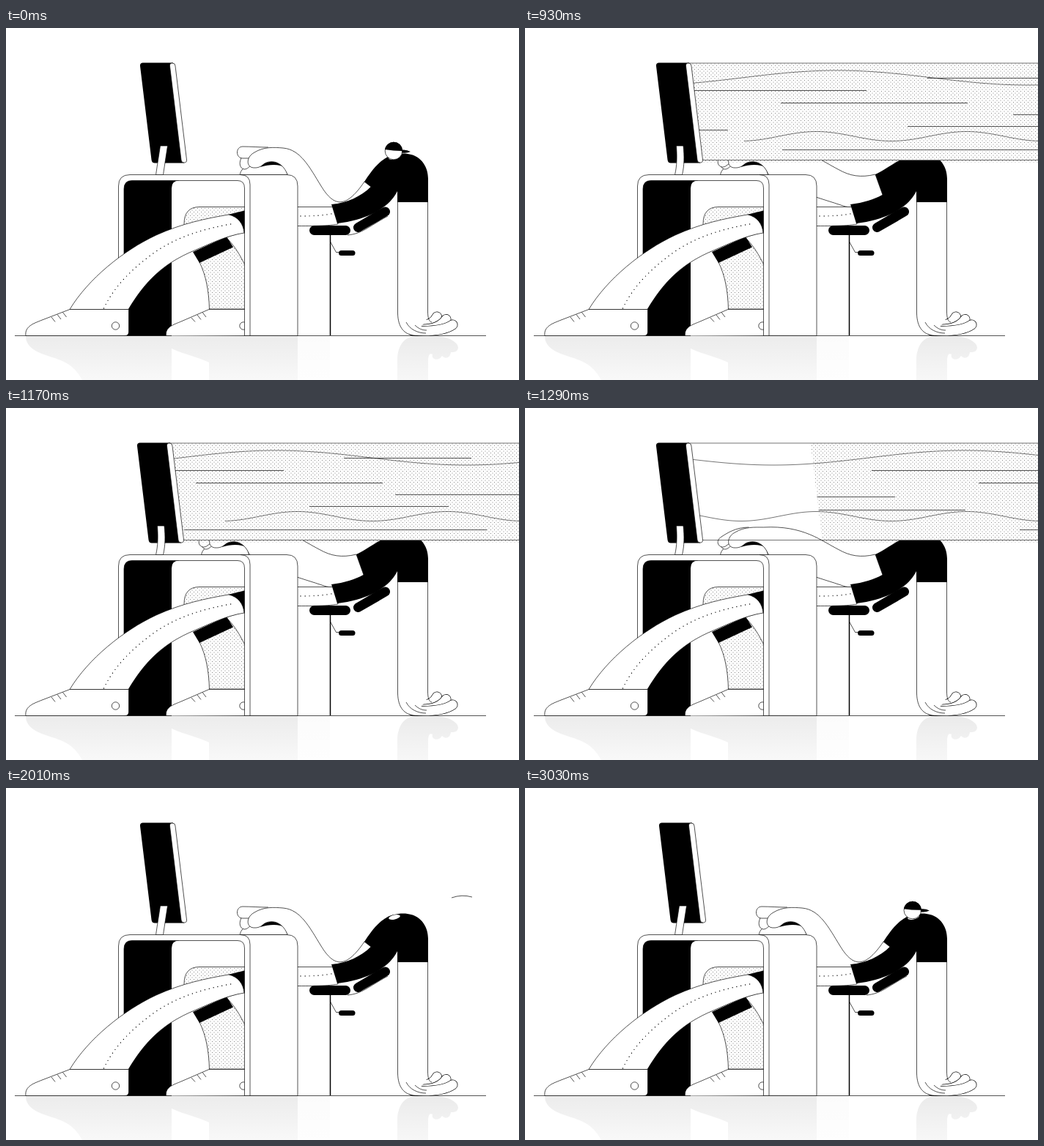
Animation of 700 by 481 pixels, one loop 3.06 s. Source, as an HTML page:

```html
<!DOCTYPE html>
<html lang="en">
<head>
<meta charset="utf-8">
<title>Desk nap</title>
<style>
html, body { margin: 0; width: 100%; height: 100%; overflow: hidden; background: #fff; }
svg { display: block; width: 700px; height: 481px; }
.o { fill: #fff; stroke: #000; stroke-width: .68; stroke-linejoin: round; }
.l { fill: none; stroke: #000; stroke-width: .68; }
.pole { stroke-width: 1.5; }
.beam { stroke-width: .55; }
.seam { fill: none; stroke: #000; stroke-width: 1.4; stroke-linecap: round; stroke-dasharray: 0 6; }
.finger { fill: none; stroke-linecap: round; }
</style>
</head>
<body>
<svg viewBox="0 0 700 481">
  <defs>
    <linearGradient id="fade" gradientUnits="userSpaceOnUse" x1="0" y1="421" x2="0" y2="490">
      <stop offset="0" stop-opacity=".08"/><stop offset="1" stop-opacity=".025"/>
    </linearGradient>
    <linearGradient id="faint" gradientUnits="userSpaceOnUse" x1="0" y1="421" x2="0" y2="490">
      <stop offset="0" stop-opacity=".075"/><stop offset="1" stop-opacity=".02"/>
    </linearGradient>
    <pattern id="dots" width="5" height="5" patternUnits="userSpaceOnUse">
      <circle cx="1.5" cy="1.5" r=".44"/><circle cx="4" cy="4" r=".44"/>
    </pattern>
    <clipPath id="inside"><rect x="161" y="208" width="164.5" height="212.5"/></clipPath>
    <clipPath id="beamClip"><polygon id="beamArea"/></clipPath>
    <clipPath id="waveClip"><polygon id="waveArea"/></clipPath>
  </defs>

  <!-- reflections -->
  <path fill="url(#faint)" d="M27 421C27 438 45 444 60 449S92 458 104 481H226V438C240 445 260 449 277 457V481H398V421Z"/>
  <path fill="url(#faint)" d="M398 421H442V481H398Z" opacity=".2"/>
  <path fill="url(#fade)" d="M534 481V452C535 432 545 421 560 421H590C606 423 617 430 617 437C616 444 609 443 607 443C606 451 600 453 595 448C590 456 580 453 582 446C577 443 576 450 576 456V481Z"/>
  <path class="l" d="M12 420.5H655"/>

  <!-- chair base -->
  <path class="l pole" d="M442.5 282V420"/>
  <path class="l" d="M442.5 292L450.5 306.5H456"/>
  <rect x="454" y="304" width="22.5" height="7" rx="3.5"/>

  <!-- mouse, hand and reaching arm -->
  <g id="hand">
    <path class="o" d="M319 200.5C323 178 380 172 384 200.5Z"/>
    <path d="M347 190C357 177 377 177 381.5 191C374 186 360 186 347 190Z"/>
    <path class="o" d="M322 176C317 184 319 192 325 193C330 193 332 189 336 186V176Z"/>
    <path class="o" id="index"/>
  </g>
  <path class="o" id="arm"/>

  <!-- far thigh, torso, hanging arm -->
  <path class="o" d="M380 244.5H448L453 268C435 271 415 270.5 380 270.5Z"/>
  <path class="seam" d="M402 257C420 257 434 256 446 253.5"/>
  <path class="l" id="spring"/>
  <path id="torso"/>
  <rect x="414" y="270" width="56" height="13" rx="6.5"/>
  <path d="M480.5 272.5L517.5 251" stroke="#000" stroke-width="13" stroke-linecap="round"/>
  <g id="fingers"></g>
  <path fill="#fff" d="M534.5 238V390C535 409 543 420 562 420L567 407C573 402 575.5 396 575.5 388V238Z"/>
  <path class="l" d="M534.5 222V390C535 409 543 420.5 562 420.5M575.5 237V387C575.5 396 577 401 581 402"/>
  <path class="l" d="M546 402C551 412 562 417 573 417M558 406C563 411 568 413 574 413"/>

  <!-- desk -->
  <path class="o" d="M153.5 420V216Q153.5 200.5 169 200.5H383Q398 200.5 398 216V420.5Z"/>
  <path d="M161 420.5V220Q161 208.5 172 208.5H236V420.5Z"/>
  <path fill="#fff" d="M226 421V219Q226 208.5 236 208.5H326V420Z"/>
  <g clip-path="url(#inside)">
    <path class="o" style="fill:url(#dots)" d="M243 384V268Q243 244.5 264 244.5H330V384Z"/>
    <path fill="#fff" d="M226 300H258L264 320C273 338 277 360 277.5 386H226Z"/>
    <path class="l" d="M264 320C273 338 277 360 277.5 385"/>
    <path class="o" d="M300 286C310 295 319 309 327 326V278Z"/>
    <path d="M255 306L301 285L310 299.5L264 321Z"/>
    <path class="o" d="M218.5 420.5C217 408 230 405 239 401L277 384.5H330V420.5Z"/>
    <path class="l" d="M253 396L258 401.5M261 392L266 398.5M268 388.5L273 395"/>
    <circle class="o" cx="324" cy="407" r="5.2"/>
  </g>
  <path class="l" d="M161 310V220Q161 208.5 172 208.5H316Q325.5 208.5 325.5 219V420.5M333 420.5V214Q333 200.5 320 200.5"/>

  <!-- near leg -->
  <path d="M303 255L325.5 249.5V281Z"/>
  <path class="o" d="M87 384.5C112 343 160 304 205 283C240 267 274 260 304 255C317 258 324 268 325 280C300 284 278 295 257 304C214 322 190 346 167 384.5Z"/>
  <path class="seam" d="M133.5 383C148 352 174 327 205 305C235 285 270 274 312 267"/>
  <path class="o" d="M27 420.5C25 407 40 403 48 399.5L87 384.5H167.5V415Q167.5 420.5 162 420.5Z"/>
  <path class="l" d="M62 395L67 401.5M70 391.5L75 398M77.5 388.5L82.5 395"/>
  <circle class="o" cx="149.5" cy="407" r="5.2"/>

  <!-- neck and head -->
  <g transform="rotate(-13 530 176.5)">
    <ellipse cx="530" cy="176.5" rx="8" ry="3" fill="#fff"/>
    <path class="l" id="neckMark" d="M527 174V179"/>
  </g>
  <g id="head">
    <circle class="o" cx="529" cy="168" r="11.8"/>
    <path d="M517 166A12.1 12.1 0 0 1 541 166.5Q547 166 552 169Q547 171.5 540 170.5V168Q529 168 517 166Z"/>
  </g>
  <g id="specks"></g>
  <path class="l" id="wisp" pathLength="1" d="M608 150Q622 145 636 149"/>

  <!-- beam -->
  <g clip-path="url(#beamClip)">
    <path fill="#fff" d="M222 48H700V181H222Z"/>
    <path fill="url(#dots)" d="M222 48H700V184H222Z"/>
    <path class="l" id="streaks"/>
  </g>
  <path class="l beam" id="waves" clip-path="url(#waveClip)"/>

  <!-- monitor -->
  <g id="screen">
    <path d="M187 47.5H228L243 184.5H203Q199 184.5 198.5 180L183 52Q182.5 47.5 187 47.5Z"/>
    <path class="o" d="M223.5 52Q223 48 227 48T231 52L246.5 180Q247 184 243 184T239 180Z"/>
  </g>
  <path class="o" id="stand"/>
</svg>

<script>
const LOOP = 3060, STEP = 30;
const $ = id => document.getElementById(id);
const clamp = v => Math.max(0, Math.min(1, v));
const ramp = (t, a, b) => clamp((t - a) / (b - a));
const ease = (t, a, b) => { const k = ramp(t, a, b); return k * k * (3 - 2 * k); };
const set = (id, name, value) => $(id).setAttribute(name, value);
const show = (id, on) => { $(id).style.display = on ? "" : "none"; };

// blend two paths that share the same commands
function mix(a, b, k) {
  const to = b.match(/-?[\d.]+/g);
  let i = 0;
  return a.replace(/-?[\d.]+/g, n => +(+n + (to[i++] - n) * k).toFixed(2));
}

// value from rows of [time, value]
function track(rows, t) {
  if (t <= rows[0][0]) return rows[0][1];
  for (let i = 1; i < rows.length; i++) {
    const [a, u] = rows[i - 1], [b, v] = rows[i];
    if (t <= b) return u + (v - u) * ease(t, a, b);
  }
  return rows[rows.length - 1][1];
}

const armNear = "M340,191 C327,192 327,176 339,170 C352,162 366,163 378,164 C402,166 414,190 430,216 C446,242 462,250 489,210 L498,217 C470,248 450,262 430,262 C395,262 384,235 384,200 C376,180 360,181 353,185 C349,188 346,191 340,191";
const armFar = "M287.5,191 C274.5,192 274.5,176 286.5,170 C299.5,162 313.5,163 325.5,163 C380,160 405,182 428,193.5 C443,202 458,205 478,200 L488,228 C470,240 452,249 434,243 C405,233 360,222 332,200 C324,180 308,181 301,185 C297,188 294,191 287.5,191";
const torsoEnd = " C538,170.5 547,171 553,173 C568,177 576,191 576,206 L576,238 L534,238 L534,223 C523,245 495,262 452,267 Z";
const torsoNear = "M444,241 C466,239 484,230 498,217 L489,210 C498,196 510,179 527,173.5" + torsoEnd;
const torsoFar = "M444,241 C462,239 476,234 488,228 L478,200 C492,194 508,180 527,173.5" + torsoEnd;
const indexFlat = "M358,163 C346,163 334,162 323,162 C313,162 313,178 323,178 L345,178";
const indexDown = "M358,163 C340,163 328,171 319,177 C311,184 319,193 326,189 L345,175";
const indexUp = "M358,163 C340,160 325,155 314,150 C304,147 302,160 310,165 L345,178";
const springNear = "M466,283 C486,281 492,273 521,257";
const springFar = "M466,278 C478,276 484,268 517,252";
const standRest = "M210.5,161 L220.5,161 C218.5,174 216.5,187 214.5,200.5 L204.5,200.5 C206.5,187 208.5,174 210.5,161";
const standBent = "M206.5,161 L216,161 C217.5,175 217.5,188 214.5,200.5 L204.5,200.5 C207.5,188 207.5,175 206.5,161";

// y, left, right, time seen there, speed in px/ms
const streaks = [
  [68.5, 110, 284, 1050, 2.925], [121.5, 400, 595, 1050, 3], [139.5, 299, 709, 1050, 3.6],
  [85.5, 125, 379, 1170, 2.9], [102.5, 259, 514, 1170, 3], [118.5, 531, 731, 1170, 4.5],
  [134.5, 414, 604, 1170, 3.6], [166.5, 243, 656, 1170, 3.6]
];
const CYCLE = 270;

const specks = [[538, 163.5, 2], [549, 163.5, 2.2], [557, 161.5, 1.8], [567.5, 164, 2.6], [556, 168.5, 2], [566.5, 171, 1.6]];
$("specks").innerHTML = specks.map(([, , r], i) =>
  `<ellipse rx="${r * (i == 3 ? 1.4 : 1)}" ry="${r * .85}"/>`).join("");

$("fingers").innerHTML = ["M560 405Q581 409 588 394.5", "M556 411Q589 415 600.5 398", "M555 413.5Q594 416 609.5 405.5"]
  .map(d => [["#000", 14], ["#fff", 12.6]].map(([c, w]) =>
    `<path class="finger" d="${d}" stroke="${c}" stroke-width="${w}"/>`).join("")).join("");

function drawStreaks(t) {
  let d = "";
  for (const [y, a, b, at, v] of streaks) {
    for (let n = -2; n < 3; n++) {
      const dx = (t - at - n * CYCLE) * v;
      if (b + dx > 220 && a + dx < 700) d += `M${a + dx} ${y}H${b + dx}`;
    }
  }
  set("streaks", "d", d);
}

function wave(from, fn) {
  let d = "";
  for (let x = from; x <= 704; x += 4) d += `${d ? "L" : "M"}${x} ${fn(x).toFixed(2)}`;
  return d;
}

function drawBeam(t) {
  const grow = 500 * Math.pow(ramp(t, 690, 900), 1.4);
  const area = tail => `${222 + tail},40 ${222 + grow},40 ${240 + grow},190 ${240 + tail},190`;
  const on = t >= 690 && t < 1740;
  const gone = 500 * ramp(t, 1230, 1410);
  set("beamArea", "points", on && gone < 500 ? area(gone) : "");
  set("waveArea", "points", on ? area(500 * ramp(t, 1530, 1740)) : "");
  if (!on) return;
  drawStreaks(t);
  const close = ramp(t, 1290, 1575) * 66.5;
  const high = x => 68 + 10 * Math.cos(2 * Math.PI * ((x - 397) / 520 - (t - 1050) / CYCLE));
  const low = x => 148 + 6.5 * Math.cos(2 * Math.PI * (x - 500) / 205);
  let d = wave(224, high) + wave(t < 1230 ? 299 : 232, low);
  if (close < 66) d += `M222 ${48 + close}H700M222 ${180.5 - close}H700`;
  set("waves", "d", d);
}

function drawHead(t) {
  show("head", t < 1230 || t > 2310);
  let y = 0, s = 1, r = 0;
  if (t > 2310) {
    s = track([[2310, .1], [2580, 1]], t);
    y = track([[2310, 4], [2520, 0], [2730, -16], [2850, -15], [2940, 1], [3030, -1]], t);
    r = track([[2310, -30], [2580, 0], [2760, -8], [2880, 8], [2970, -4], [3030, -1]], t);
  }
  set("head", "transform", `translate(530 ${177 + y}) rotate(${r}) scale(${s}) translate(-530 -177)`);
  show("neckMark", t > 1230 && t < 1740);
}

function drawDebris(t) {
  const on = t >= 1320 && t < 1740;
  show("specks", on);
  if (on) {
    const u = (t - 1320) / 120, size = 1 - ramp(t, 1500, 1740);
    specks.forEach(([x, y], i) => $("specks").children[i].setAttribute("transform",
      `translate(${534 + (x - 534) * u} ${174 + (y - 174) * Math.min(u, 1.8)}) rotate(${i * 50 - 160}) scale(${size})`));
  }
  show("wisp", t >= 1890 && t < 2130);
  const left = ramp(t, 2010, 2130);
  set("wisp", "transform", `translate(${Math.min(0, t - 2010) * .25} 0)`);
  set("wisp", "stroke-dasharray", `0 ${left} ${1 - left} 1`);
}

function draw(t) {
  const reach = ease(t, 180, 420) - ease(t, 1710, 1980);
  set("arm", "d", mix(armNear, armFar, reach));
  set("torso", "d", mix(torsoNear, torsoFar, reach));
  set("spring", "d", mix(springNear, springFar, reach));
  show("spring", reach < .9);
  set("hand", "transform", `translate(${-52.5 * reach} 0)`);

  const press = ramp(t, 660, 750) - ramp(t, 1650, 1740);
  const lift = ease(t, 2310, 2460) - ease(t, 2640, 2820);
  set("index", "d", lift > 0 ? mix(indexFlat, indexUp, lift) : mix(indexFlat, indexDown, press));

  const push = ease(t, 660, 780) - ease(t, 1620, 1740);
  set("screen", "transform", `translate(${-4 * push} 0)`);
  set("stand", "d", mix(standRest, standBent, push));

  drawHead(t);
  drawDebris(t);
  drawBeam(t);
}

const start = performance.now();
function tick(now) {
  const t = Math.max(0, now - start) % LOOP;
  draw(Math.floor(t / STEP) * STEP);
  requestAnimationFrame(tick);
}
draw(0);
requestAnimationFrame(tick);
</script>
</body>
</html>
```
